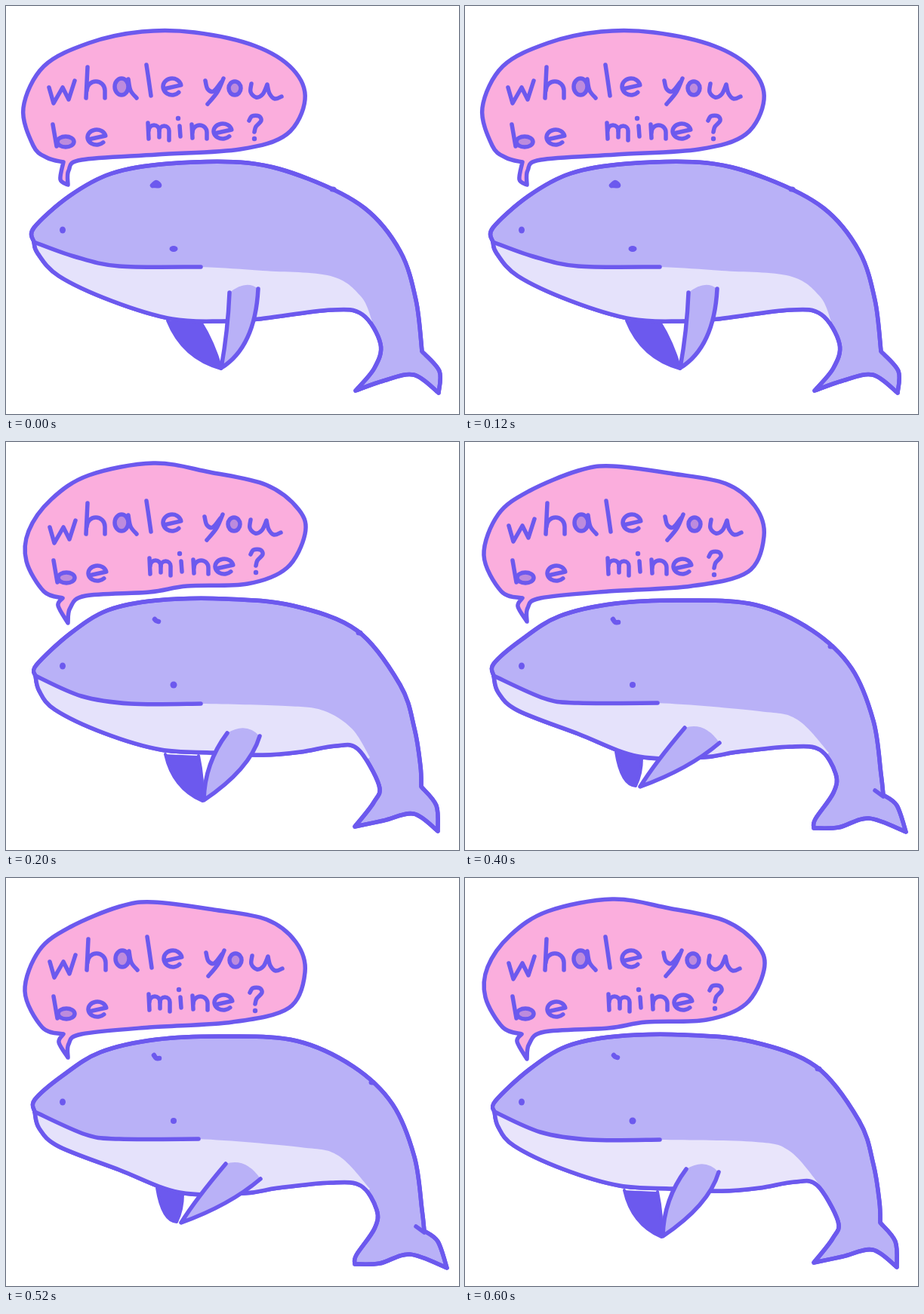
An HTML page with a canvas that plays this animation: 600x541 px, repeating every 800 ms.

```html
<!DOCTYPE html>
<html lang="en">
<head>
<meta charset="utf-8">
<title>Whale you be mine?</title>
<style>
html, body { margin: 0; width: 100%; height: 100%; overflow: hidden; background: #fff; }
canvas { display: block; width: 600px; height: 541px; }
</style>
</head>
<body>
<canvas id="stage" width="600" height="541" role="img" aria-label="A whale asking: whale you be mine?"></canvas>
<script>
const ctx = document.getElementById('stage').getContext('2d');
const INK = '#6c59ee', SKIN = '#b9b1f7', PINK = '#fbaedd', SHADE = '#bd8bdd';
const STEP = 200;

// Smooth curve through "x,y x,y"; a slash makes the point before it a sharp corner.
function trace(text) {
  const path = new Path2D();
  let last = null;
  for (const part of text.split('/')) {
    const p = part.trim().split(' ').map(s => s.split(',').map(Number));
    if (last) p.unshift(last); else path.moveTo(...p[0]);
    for (let i = 0; i < p.length - 1; i++) {
      const a = p[i - 1] || p[i], b = p[i], c = p[i + 1], d = p[i + 2] || c;
      path.bezierCurveTo(b[0] + (c[0] - a[0]) / 6, b[1] + (c[1] - a[1]) / 6,
        c[0] - (d[0] - b[0]) / 6, c[1] - (d[1] - b[1]) / 6, ...c);
    }
    last = p[p.length - 1];
  }
  return path;
}

function paint(path, color, width = 5.5) {
  if (color) {
    ctx.fillStyle = color;
    ctx.fill(path);
  }
  ctx.lineWidth = width;
  ctx.strokeStyle = INK;
  ctx.stroke(path);
}

function dot(x, y, rx, ry = rx) {
  ctx.fillStyle = INK;
  ctx.beginPath();
  ctx.ellipse(x, y, rx, ry, 0, 0, Math.PI * 2);
  ctx.fill();
}

// Parts of letters
const pen = text => paint(trace(text));

function bowl(x, y, rx, ry) {
  const path = new Path2D();
  path.ellipse(x, y, rx, ry, 0, 0, Math.PI * 2);
  paint(path, SHADE);
}

function arch(x, y, w, h) {
  const path = new Path2D(), r = w / 2;
  path.ellipse(x + r, y + r, r, r, 0, Math.PI, Math.PI * 2);
  path.lineTo(x + w, y + h);
  paint(path);
}

function letterE(x, y, rx, ry) {
  const path = new Path2D();
  path.moveTo(x - rx + 1, y + 3);
  path.ellipse(x, y, rx, ry, 0, -0.2, 0.75, true);
  paint(path);
}

const words = [
  () => pen('57,108/63,129/75,108/83,124/91,99'),
  () => {
    pen('108,81 106,122');
    arch(107, 100, 24, 22);
    bowl(153, 107, 9, 11);
    pen('162,97 165,112 173,122');
    pen('186,78 189,98 192,119');
    letterE(220, 107, 12, 11);
  },
  () => {
    pen('264,99 267,110 275,113 285,101');
    pen('288,96 280,114 267,130');
    bowl(303, 109, 8, 9);
    pen('325,103 324,114 331,121 340,117 346,104/349,116 356,123 365,120');
  },
  () => {
    pen('62,157 67,186');
    bowl(79, 180, 11, 7);
    letterE(120, 174, 12, 10);
  },
  () => {
    pen('189,155 190,176');
    arch(190, 158, 14, 16);
    arch(204, 159, 13, 19);
    pen('231,159 232,173');
    dot(229, 149, 3.2);
    pen('247,157 248,175');
    arch(248, 158, 19, 18);
    letterE(288, 166, 12, 10);
  },
  () => {
    pen('322,152 326,146 335,146 338,152 331,160 329,167');
    dot(329, 176, 3.2);
  }
];

// Fins: two roots, each with a bend towards the shared tip.
const left = {
  bubble: '76,207 54,201 36,185 23,135 50,80 110,49 180,34 250,35 330,53 380,84 396,124 372,170 310,190 ' +
    '200,197 100,204 83,218 82,237/72,230 76,207',
  body: '37,313 37,294 84,252 140,222 215,209 320,208 400,229 475,268 522,325 543,390 551,458/' +
    '574,484 573,513/540,489 500,497 463,510/488,480 496,448 472,409 430,403 335,415 285,418 220,415 ' +
    '140,391 70,358 42,328 37,313',
  mouth: '37,313 90,332 150,345 258,346',
  belly: '340,351 430,358 470,385 485,418',
  fin: { a: [296, 380], bendA: [294, 430], b: [334, 375], bendB: [330, 452], tip: [285, 480] },
  farFin: { a: [214, 417], bendA: [234, 467], b: [258, 419], bendB: [275, 446], tip: [285, 481] },
  spout: '194,238 199,234 203,238 196,238',
  knot: [433, 243],
  eye: [5.5, 4],
  shift: [[0, 0], [0, 0], [0, 0], [0, 0], [-1, 0], [0, 0]]
};

const middle = {
  bubble: '75,207 50,198 27,158 30,118 60,76 110,44 195,28 270,40 345,57 388,90 396,122 372,167 320,188 ' +
    '240,191 190,199 105,204 85,220 82,240/69,217 75,207',
  body: '39,310 40,296 85,254 135,223 200,210 290,208 380,217 465,250 522,322 541,380 549,430 550,457/' +
    '570,482 572,516/540,493 500,502 462,510/487,478 494,455 466,407 436,403 390,411 340,415 275,412 ' +
    '205,408 130,386 65,355 44,330 39,310',
  mouth: '39,310 100,337 165,347 258,347',
  belly: '370,350 420,356 458,380 482,418',
  fin: { a: [293, 386], bendA: [263, 426], b: [336, 390], bendB: [323, 434], tip: [262, 475] },
  farFin: { a: [211, 414], bendA: [221, 459], b: [255, 416], bendB: [262, 450], tip: [260, 476] },
  spout: '197,235 199,237 202,238',
  knot: [468, 253],
  eye: [4.5, 4.5],
  shift: [[1, 5], [0, 0], [-1, 0], [1, 0], [1, -1], [2, -3]]
};

const right = {
  bubble: '76,207 48,198 25,150 44,96 85,65 150,38 195,32 275,42 345,55 384,85 396,125 375,172 300,191 ' +
    '190,198 100,207 83,220 82,238/70,218 76,207',
  body: '38,310 38,294 75,262 125,231 200,214 295,210 385,216 460,250 512,300 541,370 551,440 554,468/' +
    '572,482 584,517/535,499 495,511 462,512/464,500 488,465 491,440 470,408 430,404 360,411 315,418 ' +
    '230,417 150,387 70,356 44,332 38,310',
  mouth: '38,310 105,340 150,346 255,346',
  belly: '390,357 440,368 482,412',
  fin: { a: [291, 379], bendA: [252, 425], b: [337, 399], bendB: [296, 434], tip: [232, 457] },
  farFin: { a: [200, 411], bendA: [207, 455], b: [234, 419], bendB: [234, 440], tip: [226, 456] },
  spout: '196,235 199,239 203,239',
  knot: [485, 271],
  crease: '543,462 554,470',
  eye: [4, 4],
  shift: [[1, 3], [1, 0], [1, 0], [1, 0], [0, -1], [1, 0]]
};

const back = { ...middle, belly: '385,350 430,362 469,406', bellyColor: '#e9e5fb' };
const poses = [left, middle, right, back];

function drawBubble(pose) {
  paint(trace(pose.bubble), PINK);
  words.forEach((word, i) => {
    ctx.save();
    ctx.translate(...pose.shift[i]);
    word();
    ctx.restore();
  });
}

function finEdges({ a, bendA, b, bendB, tip }) {
  const path = new Path2D();
  path.moveTo(...a);
  path.quadraticCurveTo(...bendA, ...tip);
  path.quadraticCurveTo(...bendB, ...b);
  return path;
}

function drawFin(fin) {
  const { a, b } = fin, path = finEdges(fin);
  const base = new Path2D(path);
  const lift = (b[0] - a[0]) / 4;
  base.quadraticCurveTo((a[0] + b[0]) / 2 + lift / 3, (a[1] + b[1]) / 2 - lift * 1.6, ...a);
  ctx.fillStyle = SKIN;
  ctx.fill(base);
  paint(path);
}

function drawWhale(pose) {
  paint(finEdges(pose.farFin), INK, 4);

  const body = trace(pose.body);
  paint(body, SKIN);
  ctx.save();
  ctx.clip(body);
  const belly = trace(pose.mouth + ' ' + pose.belly);
  belly.lineTo(440, 450);
  belly.lineTo(0, 450);
  ctx.fillStyle = pose.bellyColor || '#e5e2fb';
  ctx.fill(belly);
  ctx.restore();

  paint(body);
  pen(pose.mouth);
  drawFin(pose.fin);
  if (pose.crease) pen(pose.crease);
  paint(trace(pose.spout), null, 6.5);
  dot(...pose.knot, 4.5, 3.5);
  dot(75, 297, 4, 4.5);
  dot(222, 322, ...pose.eye);
}

function draw(pose) {
  ctx.fillStyle = '#fff';
  ctx.fillRect(0, 0, 600, 541);
  ctx.lineCap = ctx.lineJoin = 'round';
  drawBubble(pose);
  drawWhale(pose);
}

const start = performance.now();
function tick() {
  const t = Math.max(0, performance.now() - start);
  draw(poses[Math.floor(t / STEP) % poses.length]);
  requestAnimationFrame(tick);
}
tick();
</script>
</body>
</html>
```
